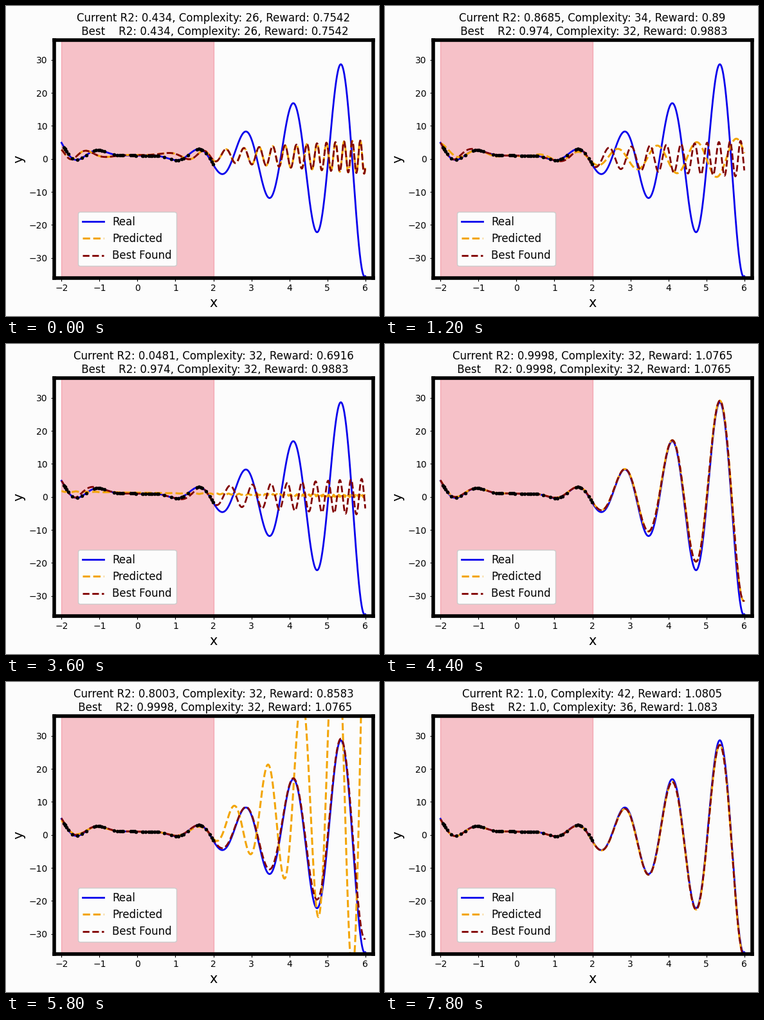
A matplotlib script that plays this animation: 580x482 px, repeating every 8 s.

```python
import numpy as np
import matplotlib.pyplot as plt
from matplotlib.animation import FuncAnimation

W, H, DPI = 580, 482, 100
FRAMES, INTERVAL = 40, 200
PAPER = "#fcfcfc"

plt.rcParams["font.family"] = "DejaVu Sans"
x = np.linspace(-2, 6, 1000)


def real(t):
    return t**2 * np.sin(5 * t) + np.exp(-t / 2)


# Candidate expressions; s scales the amplitude, w the frequency.
def weak_chirp(s=1, w=1):
    return 0.85 * s * x * np.sin(2.6 * w * x**2) + 1.2 - 0.1 * x


def good_chirp(s=1, w=1):
    amp = np.interp(np.abs(x), [0, 1, 1.6, 2.4, 6], [0, 1, 2.4, 3.1, 5.5])
    wave = np.sign(x) * amp * np.sin(1.957 * w * x**2 + 2.5)
    return s * wave + np.exp(-x / 2)


def linear_wave(s=1, w=1):
    return 1.05 * s * x * np.sin(6.03 * w * x - 1.9) + np.exp(-x / 2)


def taller_wave(s=1, w=1):
    return linear_wave(1.05 * s, w)


def near_flat(s=1, w=1):
    return 1.3 - 0.18 * s * x + 0.06 * x * np.sin(9 * w * x**2)


def cubic_wave(s=1, w=1):
    inner = 0.8 * x**2 * np.sin(5 * x) + np.exp(-x / 2)
    tail = x**3 * (0.41 * s * np.sin(7.02 * w * x + 2.73) + 0.147)
    mix = 1 / (1 + np.exp(-12 * (x - 1.9)))
    return inner * (1 - mix) + (tail + np.exp(-x / 2)) * mix


def close_fit(s=1, w=1):
    return x**2 * (0.95 * s * np.sin(5 * w * x) + 0.067) + np.exp(-x / 2)


def exact_fit(s=1, w=1):
    return x**2 * (0.985 * s * np.sin(5 * w * x) - 0.033) + np.exp(-x / 2)


# first frame, settled frame, curve, R2, complexity, reward
CURRENT = [
    (0, 0, weak_chirp, 0.434, 26, 0.7542),
    (3, 3, good_chirp, 0.974, 32, 0.9883),
    (5, 6, linear_wave, 0.8685, 34, 0.89),
    (10, 13, taller_wave, 0.8679, 30, 0.8913),
    (16, 18, near_flat, 0.0481, 32, 0.6916),
    (22, 22, close_fit, 0.9998, 32, 1.0765),
    (23, 25, cubic_wave, 0.8147, 32, 0.8626),
    (32, 35, close_fit, 0.9998, 32, 1.0765),
    (37, 37, exact_fit, 1.0, 36, 1.083),
    (38, 39, exact_fit, 1.0, 42, 1.0805),
]
BEST = [CURRENT[i] for i in (0, 1, 5, 8)]


def pick(table, k):
    return [row for row in table if row[0] <= k][-1]


def attempt(k):
    """Curve and scores tried at step k; unsettled steps vary a little."""
    _, settled, curve, r2, size, reward = pick(CURRENT, k)
    if k == settled:
        return curve(), r2, size, reward
    rng = np.random.default_rng(k)
    spread = np.sqrt(1 - r2)
    s, w = 1 + spread * rng.uniform(-1, 1, 2) * (0.2, 0.02)
    drop = (1 - r2) * 0.15 * rng.random() * min(1, 4 * r2)
    size += 2 * int(rng.integers(-2, 2))
    return curve(s, w), r2 - drop, size, reward - 0.3 * drop


def scores(r2, size, reward):
    return f"R2: {round(r2, 4)}, Complexity: {size}, Reward: {round(reward, 4)}"


fig = plt.figure(figsize=(W / DPI, H / DPI), dpi=DPI, facecolor=PAPER)
ax = fig.add_axes([74.5 / W, 59.4 / H, 496 / W, 369.6 / H], facecolor=PAPER)
ax.set(xlim=(-2.2, 6.2), ylim=(-36, 36))
ax.set_xticks(range(-2, 7))
ax.set_yticks(range(-30, 31, 10))
ax.set_xlabel("x", fontsize=15)
ax.set_ylabel("y", fontsize=15)
for spine in ax.spines.values():
    spine.set_linewidth(4)

ax.axvspan(-2, 2, color="#e61230", alpha=0.25, lw=1)
ax.plot(x, real(x), color="#0800ec", lw=2, label="Real")
guess, = ax.plot([], [], "--", color="#f3a505", lw=2.2, label="Predicted")
found, = ax.plot([], [], "--", color="#800000", lw=2, label="Best Found")

samples = np.array([
    -1.93, -1.91, -1.9, -1.87, -1.82, -1.72, -1.58, -1.46, -1.35, -1.14,
    -1.09, -1.02, -0.99, -0.94, -0.87, -0.62, -0.53, -0.47, -0.42, -0.38,
    -0.18, -0.13, -0.08, -0.04, 0.13, 0.15, 0.21, 0.3, 0.35, 0.38, 0.45,
    0.52, 0.55, 0.7, 0.89, 1.01, 1.07, 1.16, 1.21, 1.33, 1.57, 1.62, 1.67,
    1.7, 1.8, 1.9, 1.95, 1.99])
ax.scatter(samples, real(samples), s=10, color="black", lw=0.8, zorder=5)

ax.legend(loc=(37.5 / 496, 18.5 / 369.6), fontsize=12, framealpha=1,
          facecolor=PAPER).set_zorder(6)
title = ax.set_title("", fontsize=12)


def draw(k):
    y, *now = attempt(k)
    _, _, curve, *top = pick(BEST, k)
    guess.set_data(x, y)
    found.set_data(x, curve())
    title.set_text(f"Current {scores(*now)}\n Best    {scores(*top)}")
    return guess, found, title


anim = FuncAnimation(fig, draw, frames=FRAMES, interval=INTERVAL,
                     repeat=True, repeat_delay=0, blit=False)
plt.show()
```
